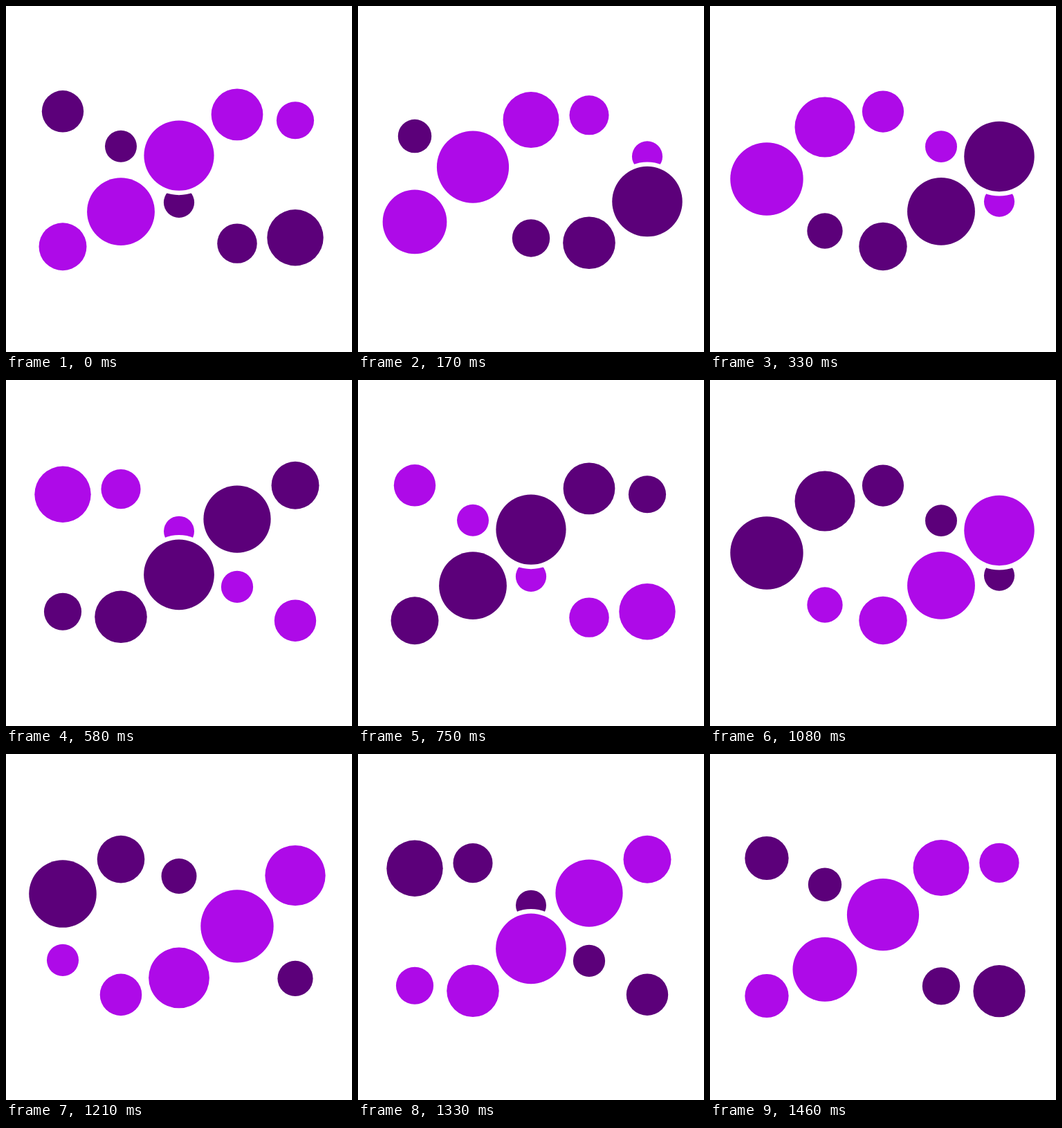
Recreate the animation shown at these times as an HTML page with a canvas. Size 500 px wide and 500 px high, loop 1.5 s.

```html
<!DOCTYPE html>
<html lang="en">
<head>
<meta charset="utf-8">
<title>Helix loader</title>
<style>
  html, body { margin: 0; width: 100%; height: 100%; overflow: hidden; background: #fff; }
  canvas { display: block; width: 500px; height: 500px; }
</style>
</head>
<body>
<canvas id="stage" width="500" height="500"></canvas>
<script>
const ctx = document.getElementById('stage').getContext('2d');
const LOOP = 1500;
const FRAMES = 36;
const HALF = FRAMES / 2;
const LIGHT = '#ae0ae8';
const DARK = '#5c007a';
const CENTER = 250;
const SWING = 99.5;
const UNIT = 21.08;
const GAP = 6.4;
const columnLead = [0, 5.05, 10.08, 15.07, 20];

const mod = (value, size) => ((value % size) + size) % size;
const smooth = s => s * s * (3 - 2 * s);

// Linear start, soft end: cubic-bezier(1/6, 1/6, 2/3, 1).
function settle(s) {
  const curve = (u, a, b) => 3 * a * u * (1 - u) ** 2 + 3 * b * u * u * (1 - u) + u ** 3;
  let low = 0, high = 1;
  for (let i = 0; i < 24; i++) {
    const mid = (low + high) / 2;
    if (curve(mid, 1 / 6, 2 / 3) < s) low = mid;
    else high = mid;
  }
  return curve(low, 1 / 6, 1);
}

// A ball starts at the bottom, rises in front, then sinks behind.
function makeBall(x, phase, color) {
  const p = mod(phase + 1, FRAMES);
  const front = p < HALF;
  const s = (p % HALF) / HALF;
  const travel = SWING * (1 - 2 * smooth(s));
  const depth = settle(1 - Math.abs(2 * s - 1));
  return {
    x, color, front,
    y: CENTER + (front ? travel : -travel),
    r: UNIT * (1.5 + (front ? depth : -depth / 2))
  };
}

function disc(x, y, r, color) {
  ctx.fillStyle = color;
  ctx.beginPath();
  ctx.arc(x, y, r, 0, 2 * Math.PI);
  ctx.fill();
}

function drawBall({ x, y, r, color, front }) {
  if (front) disc(x, y, r + GAP, '#fff');
  disc(x, y, r, color);
}

function draw(time) {
  // 24 steps per second, each starting on a whole hundredth of a second.
  const ticks = Math.floor((time % LOOP) / 10);
  const step = Math.ceil((ticks + 0.5) * 6 / 25) - 1;

  ctx.fillStyle = '#fff';
  ctx.fillRect(0, 0, 500, 500);
  const balls = columnLead.flatMap((lead, i) => {
    const x = 82 + 84 * i;
    return [makeBall(x, step + lead, LIGHT), makeBall(x, step + lead + HALF, DARK)];
  });
  balls.sort((a, b) => a.front - b.front).forEach(drawBall);
}

let start;
function tick(now) {
  start ??= now;
  draw(Math.max(0, now - start));
  requestAnimationFrame(tick);
}
draw(0);
requestAnimationFrame(tick);
</script>
</body>
</html>
```
